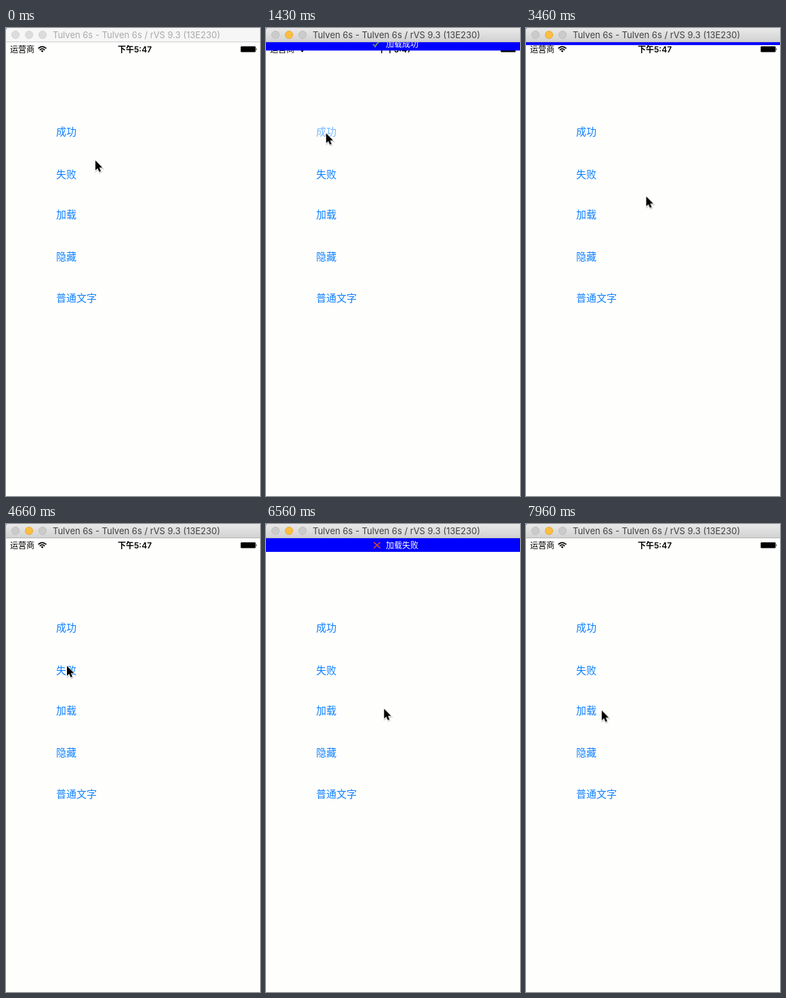
An HTML page for the animation above (8000 ms loop, 375x689 px).

```html
<!DOCTYPE html>
<html lang="zh">
<head>
<meta charset="utf-8">
<title>Status bar notice</title>
<style>
  html, body { margin: 0; width: 100%; height: 100%; overflow: hidden; background: #fefefd; }
  svg { display: block; width: 375px; height: 689px; }
  text { font-family: Inter, "Noto Sans CJK SC", "Noto Sans CJK", sans-serif; }
  .button { font-size: 15px; fill: #0f80ff; }
  .small { font-size: 12px; }
</style>
</head>
<body>
<svg viewBox="0 0 375 689">
  <defs>
    <linearGradient id="chrome" x2="0" y2="1">
      <stop stop-color="#e9e9e9"/><stop offset="1" stop-color="#d1d1d1"/>
    </linearGradient>
  </defs>
  <rect width="375" height="689" fill="#fefefd"/>

  <g id="status">
    <text class="small" x="6" y="35.5">运营商</text>
    <g fill="none" stroke="#000" stroke-width="1.7">
      <path d="M47.6 30.2Q53.5 24.6 59.4 30.2M49.8 32.4Q53.5 29 57.2 32.4"/>
      <path d="M51.5 33.6Q53.5 32 55.5 33.6L53.5 35.7Z" fill="#000" stroke="none"/>
    </g>
    <text class="small" x="165" y="35.5" font-weight="600">下午5:47</text>
    <rect x="346.5" y="27" width="22" height="8.6" rx="1.3"/>
    <path d="M369.3 29.6Q371.2 31.3 369.3 33Z"/>
  </g>

  <g id="buttons"></g>

  <g id="banner">
    <rect width="375" height="20" fill="#00f"/>
    <text class="small" x="177" y="14.6" fill="#fff">加载<tspan id="result"></tspan></text>
    <path id="check" d="M158 10.5L161.3 14.2Q164 8.5 169.8 5.6" fill="none" stroke="#7fa63c" stroke-width="1.7"/>
    <path id="cross" d="M159.3 5.8L168.6 14.6M168.6 5.8L159.3 14.6" stroke="#e0492f" stroke-width="1.5"/>
  </g>

  <g id="title"></g>

  <g id="cursor">
    <path d="M0 0V14.6L3.3 11.5L5.6 16.7L8 15.7L5.8 10.6H10.4Z" transform="translate(.6 1.4)"
      fill="#000" stroke="#000" stroke-width="2" opacity=".16"/>
    <path d="M0 0V14.6L3.3 11.5L5.6 16.7L8 15.7L5.8 10.6H10.4Z"
      stroke="#fff" stroke-width="1.4" paint-order="stroke"/>
  </g>
</svg>
<script>
const LOOP = 8000;
const $ = id => document.getElementById(id);

const titleBar = (id, fill, line, ink, lights) => `<g id="${id}">
  <path d="M0 0H3Q0 0 0 3Z" fill="#3b6ba5"/>
  <path d="M0 3Q0 0 3 0H375V21H0Z" fill="${fill}"/>
  <path d="M0 20.5H375" stroke="${line}"/>
  ${lights.map(([c, rim], i) => `<circle cx="${14 + 20 * i}" cy="10" r="5.6" fill="${c}" stroke="${rim}" stroke-width=".8"/>`).join('')}
  <text x="69" y="14.9" font-size="13" fill="${ink}">Tulven 6s - Tulven 6s / rVS 9.3 (13E230)</text></g>`;

const pale = ['#dcdcdc', '#cfcfcf'], gray = ['#cbcbcb', '#b9b9b9'], amber = ['#fdbe40', '#e0a32f'];
$('title').innerHTML =
  titleBar('inactive', '#f6f6f6', '#d0d0d0', '#a9a9a9', [pale, pale, pale]) +
  titleBar('active', 'url(#chrome)', '#b5b5b5', '#404040', [gray, amber, gray]);

const labels = [['成功', 158.3], ['失败', 221.2], ['加载', 280.3], ['隐藏', 341.5], ['普通文字', 403]];
$('buttons').innerHTML = labels.map(([s, y], i) =>
  `<text class="button" id="button${i}" x="74" y="${y}">${s}</text>`).join('');

// Steps are [ms, value, easing towards the next step].
function play(el, prop, steps) {
  const all = [[0, steps[0][1]], ...steps, [LOOP, steps.at(-1)[1]]];
  return el.animate(
    all.map(([t, v, easing = 'linear']) => ({ offset: t / LOOP, [prop]: v, easing })),
    { duration: LOOP, iterations: Infinity });
}
const at = (x, y) => `translate(${x}px, ${y}px)`;
const jump = (t, from, to) => [[t, from], [t, to]];

const shows = [1290, 5545], slide = 250, hold = 2000;
const animations = [
  play($('banner'), 'transform', shows.flatMap(t => [
    [t, at(0, 1), 'ease-in-out'], [t + slide, at(0, 21)],
    [t + hold, at(0, 21), 'ease-in-out'], [t + hold + slide, at(0, 1)]
  ])),
  play($('check'), 'opacity', jump(4500, 1, 0)),
  play($('cross'), 'opacity', jump(4500, 0, 1)),
  play($('active'), 'opacity', jump(1200, 0, 1)),
  ...[1200, 5330].map((press, i) => play($('button' + i), 'opacity', [
    ...jump(press, 1, .2), [shows[i], .2, 'ease-in-out'], [shows[i] + 300, 1]
  ])),
  play($('cursor'), 'transform', [
    [0, at(132, 195), 'ease-in-out'], [530, at(88.7, 155)],
    [1660, at(88.7, 155), 'ease-in'], [2015, at(125.5, 170.5), 'ease-out'],
    [2600, at(175.5, 246)],
    [2800, at(175.5, 246)], [2930, at(177.5, 248)],
    [3580, at(177.5, 248), 'ease-in-out'], [4110, at(96, 211), 'ease-out'],
    [4360, at(91.5, 209)], [4630, at(91.5, 209)], [4660, at(90, 209)],
    [5800, at(90, 209), 'ease-in-out'], [6370, at(167.5, 263.5), 'ease-out'],
    [6560, at(174.3, 272)],
    [7390, at(174.3, 272), 'ease-in-out'], [7950, at(111.8, 274.5)]
  ])
];

const start = performance.now();
function tick(now) {
  const t = Math.max(0, now - start) % LOOP;
  $('result').textContent = t < 4500 ? '成功' : '失败';
  for (const a of animations) a.currentTime = t;
  requestAnimationFrame(tick);
}
tick(start);
</script>
</body>
</html>
```
